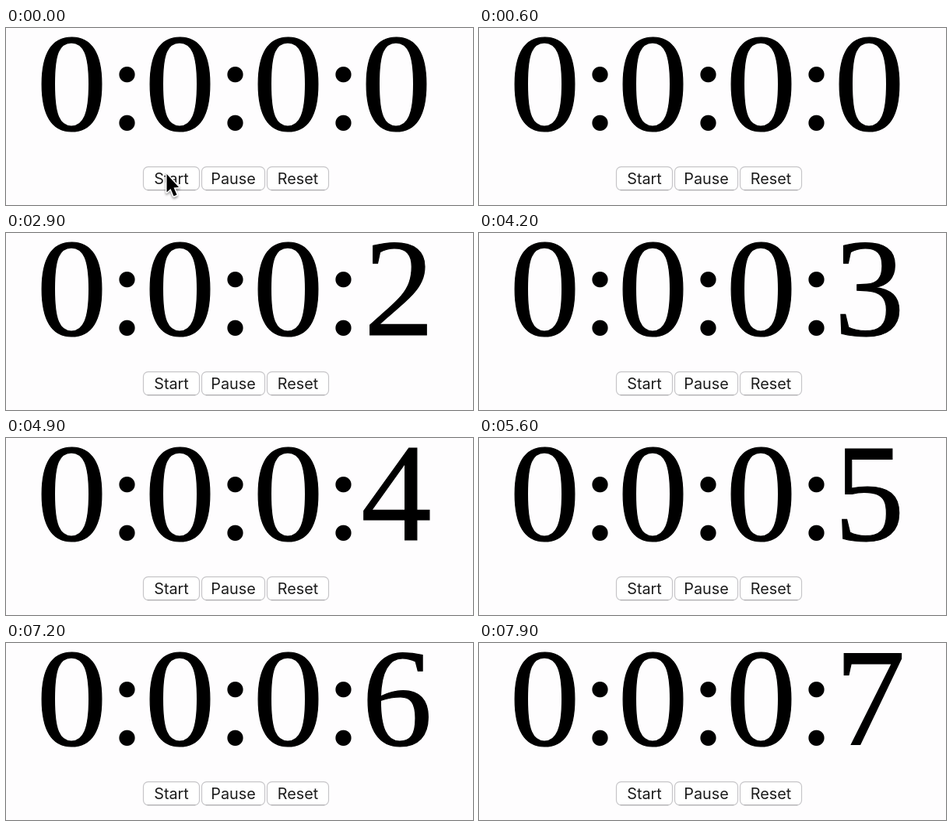
An HTML page for the animation above (8 s loop, 600 by 229 pixels).

```html
<!DOCTYPE html>
<html lang="en">
<head>
<meta charset="utf-8">
<title>Stopwatch</title>
<style>
  html, body { margin: 0; width: 100%; height: 100%; overflow: hidden; background: #fefdfe; }
  svg { display: block; width: 600px; height: 229px; }
  text { text-anchor: middle; }
  .digit {
    font: 181px "Liberation Serif", Times, serif;
    stroke: #000; stroke-width: 1.2px;
  }
  .colon { font: 172px "Liberation Serif", Times, serif; }
  .label { font: 19.8px Inter, sans-serif; fill: #1c1c1c; }
  .button { fill: #fff; stroke: #c6c5c8; stroke-width: 1.2px; }
  .edge { stroke: #aeadb0; stroke-width: 1.2px; }
  .cursor { stroke: #fff; stroke-width: 3px; stroke-linejoin: round; paint-order: stroke; }
  #pointer { filter: drop-shadow(0 2px 1.5px rgba(0, 0, 0, .4)); }
</style>
</head>
<body>
<svg id="stage" viewBox="0 0 600 229"></svg>
<script>
  const LOOP = 8000;
  const CLICK = 300;        // the clock starts here and ticks every second
  const CURSOR_GONE = 600;
  const NUDGE = { 2: 3.5, 6: 1, 7: 1 };

  const stage = document.getElementById("stage");

  function add(tag, attrs, content = "", parent = stage) {
    const el = document.createElementNS("http://www.w3.org/2000/svg", tag);
    for (const key in attrs) el.setAttribute(key, attrs[key]);
    el.textContent = content;
    parent.append(el);
    return el;
  }

  const digitX = i => 84.4 + 139 * i;
  const digits = [];
  for (let i = 0; i < 4; i++) {
    digits.push(add("text", { class: "digit", x: digitX(i), y: 132 }, "0"));
    if (i < 3) add("text", { class: "colon", x: digitX(i) + 71.2, y: 131.3 }, ":");
  }

  function addButton(label, x, width) {
    add("rect", { class: "button", x, y: 179.6, width, height: 30, rx: 6 });
    add("line", { class: "edge", x1: x + 5, x2: x + width - 5, y1: 209.6, y2: 209.6 });
    add("text", { class: "label", x: x + width / 2, y: 202 }, label);
  }
  addButton("Start", 176.5, 72);
  addButton("Pause", 251.5, 81);
  addButton("Reset", 335.5, 79);

  const pointer = add("g", { id: "pointer" });
  add("path", {
    class: "cursor",
    d: "M206.5 189V212.5L211.5 208L215.5 217.5L219.5 215.8L215.5 206.5L222 206Z"
  }, "", pointer);

  const start = performance.now();

  function draw(now) {
    const t = Math.max(0, now - start) % LOOP;
    const seconds = Math.max(0, Math.floor((t - CLICK) / 1000));
    const last = digits[3];
    if (last.textContent !== String(seconds)) {
      last.textContent = seconds;
      last.setAttribute("x", digitX(3) + (NUDGE[seconds] || 0));
    }
    pointer.style.display = t < CURSOR_GONE ? "" : "none";
    requestAnimationFrame(draw);
  }
  draw(start);
</script>
</body>
</html>
```
